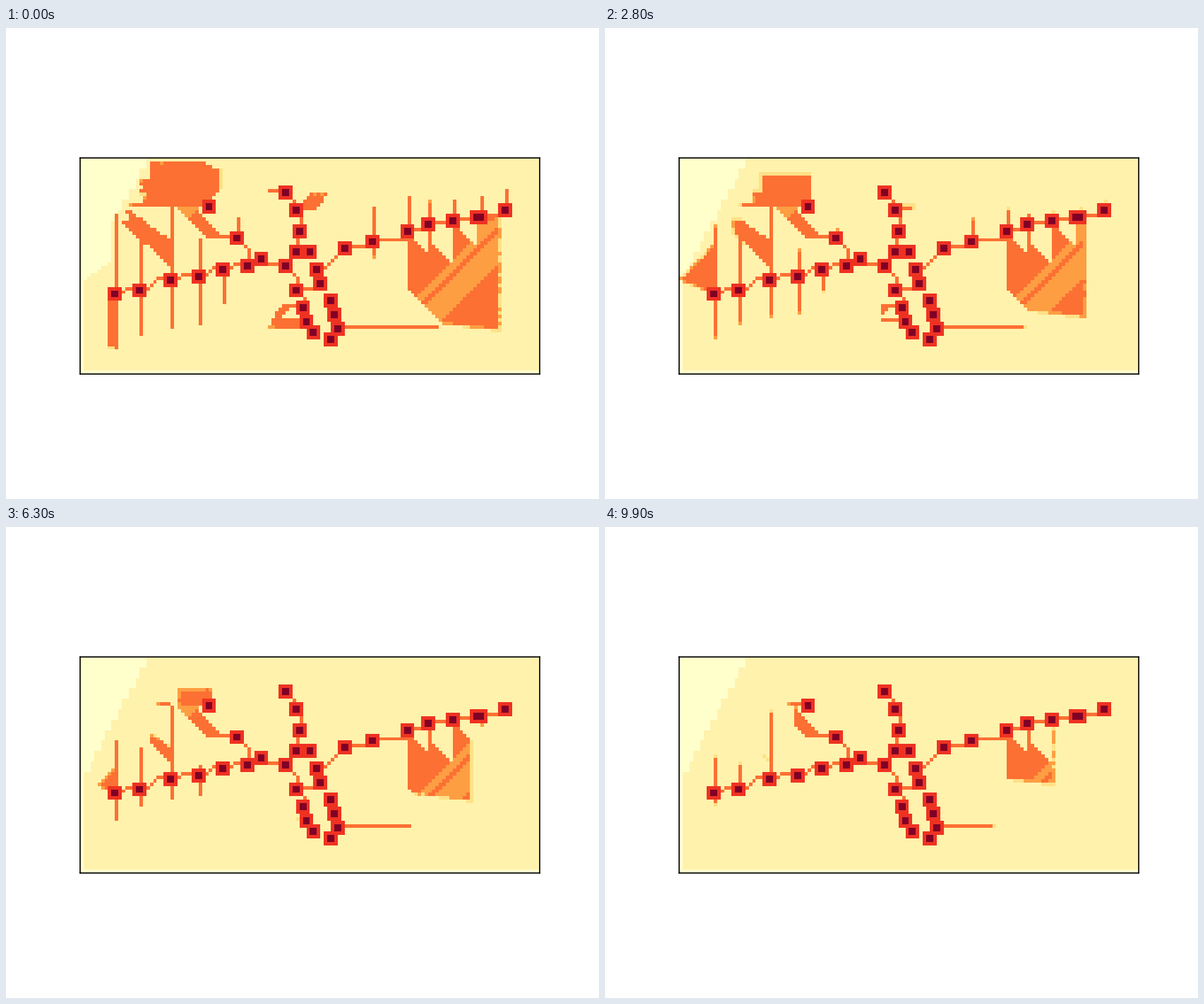
A matplotlib script that plays this animation: 840x667 px, repeating every 10000 ms.

```python
import numpy as np
import matplotlib.pyplot as plt
from matplotlib.animation import FuncAnimation
from matplotlib.path import Path

ROWS, COLS, FRAMES = 62, 132, 100
SPEED = 0.13  # cells worn away per frame
BASE, TIP, LIGHT, TRAIL, RED, CORE = 0.088, 0.2, 0.44, 0.556, 0.69, 1.0

R, C = np.mgrid[:ROWS, :COLS]
DIAG, SLANT = R + C, R - C
NOISE = np.random.default_rng(4).uniform(-0.13, 0.13, (ROWS, COLS))

# chains of linked nodes, as (col, row)
ROUTES = [
    [(10, 39), (17, 38), (26, 35), (34, 34), (41, 32), (48, 31), (52, 29), (59, 31)],
    [(45, 23), (48, 31)],
    [(59, 10), (62, 15), (63, 21), (62, 27), (59, 31), (62, 38)],
    [(122, 15), (115, 17), (114, 17), (107, 18), (100, 19), (94, 21), (84, 24),
     (76, 26)],
    [(68, 32), (76, 26)],
    [(69, 36), (62, 38), (64, 43), (65, 47), (67, 50)],
    [(72, 41), (73, 45), (74, 49), (72, 52)],
    [(37, 14)], [(66, 27)],
]

# node -> reach of its thread upwards and downwards
SPURS = {(10, 39): (23, 16), (17, 38): (20, 13), (26, 35): (21, 14),
         (34, 34): (11, 14), (41, 32): (0, 10), (45, 23): (6, 0),
         (84, 24): (10, 4.6), (94, 21): (9.8, 0), (100, 19): (6.5, 0),
         (107, 18): (5.8, 0), (115, 17): (5.8, 11), (122, 15): (6, 0)}


def inside(points):
    centers = np.column_stack([C.ravel() + 0.5, R.ravel() + 0.5])
    return Path(points).contains_points(centers).reshape(ROWS, COLS)


CLOUD = inside([(16, 0.5), (35, 1), (40.5, 3.5), (40.5, 9), (35.5, 14), (16, 14)])
BAND = inside([(28, 14), (34, 14), (34.5, 16), (40.5, 22), (40.5, 23), (36.5, 23)])
WING = inside([(12.8, 14), (19.3, 18.8), (27, 24.2), (27, 32.2), (20, 25.2),
               (17, 24), (11.8, 18), (14.8, 18.5)])
LEAF = inside([(63.5, 13), (67, 10), (71, 10), (70, 12.5), (67, 15), (63.5, 15)])
LOOP = (inside([(54, 48.5), (58, 42), (63, 42), (63, 49), (54, 49)])
        & ~inside([(57.6, 46), (60, 43), (63, 43), (63, 46)]))

SAIL = (C >= 94) & (SLANT <= -57)
STRIPES = (DIAG >= 136) & (DIAG < 150) & (DIAG // 1 != 139) & (DIAG != 140)
PALE_BITS = SAIL & (STRIPES | ((C >= 113) & (DIAG < 139) & (R > 17)))
PALE_BITS |= BAND & (DIAG < 48)


def walk(a, b):
    """Cells from a to b: diagonal steps first, then straight."""
    (c, r), (c1, r1) = a, b
    if abs(c1 - c) >= abs(r1 - r):
        c, r1 = c + 1, r1 - 1
    yield c, r
    while (c, r) != (c1, r1):
        c += np.sign(c1 - c)
        r += np.sign(r1 - r)
        yield c, r


def draw_network():
    net = np.zeros((ROWS, COLS))
    net[22, 36:44] = TRAIL
    for route in ROUTES:
        for a, b in zip(route, route[1:]):
            for c, r in walk(a, b):
                net[r, c] = TRAIL
    for half, value in ((2, RED), (1, CORE)):
        for c, r in sum(ROUTES, []):
            net[r - half:r + half, c - half:c + half] = value
    return net


NETWORK = draw_network()


def wear(frame):
    """Remaining life of each trail cell; zero or less is gone."""
    s = SPEED * frame
    life = np.full((ROWS, COLS), -1.0)

    def put(mask, *limits):
        value = np.minimum.reduce([limit + 0.0 * C for limit in limits])
        np.maximum(life, np.where(mask, value, -1), out=life)

    def low(i, start):
        return i + 1 - start - s

    def high(i, start):
        return start - s - i

    # threads
    for (c, r), (up, down) in SPURS.items():
        put((C == c) & (R < r), low(R, r - up))
        put((C == c) & (R >= r), high(R, r + down))
    put((C == 26) & (R >= 14) & (R < 35), low(R, 3))
    put((R == 48) & (C >= 75), high(C, 103))
    put((R == 9) & (C < 59) & (C > 50), low(C, 54.2))
    put((R == 13) & (C < 26), low(C, 14.3))
    put((R == 13) & (C >= 30) & (C < 36), low(C, 18.6))

    # top left patches
    shoulder = np.minimum(low(C, 18) + 6 * NOISE, low(R, 6.2))
    side = np.where(C < 38, 9, high(C, 40.2))
    put(CLOUD, low(R, 1.2), np.maximum(low(C, 20.2), shoulder), side)
    put(BAND, low(C, 20.2))
    put(WING, low(C, 12), low(R, 14.1), low(R - 0.8 * C, -0.7) + 0.025 * frame,
        np.where(SLANT < 5, 9, high(SLANT, 9.7)))

    # small patches
    put((C >= 8) & (C <= 10) & (R >= 41), low(C, 8.1), high(R, 54.3))
    put(LEAF, high(C, 71), low(R, 10.3))
    put(LOOP, low(C, 54.6), np.where(R < 47, 9, high(R, 48.8)))

    # fan that sweeps down the left edge and closes again
    gap = 10 - C
    top = 21 + 0.2 * (frame - 10) + gap
    bottom = min(39, 28 + 0.8 * (frame - 11)) - 0.4 * gap
    put(C <= 10, R + 1 - top, bottom - R)

    # sail on the right, hung from three teeth
    edge = np.select([C < 100, C == 100, C < 107, C <= 108, C < 114],
                     [C - 72, 20, C - 76, 20, 20 + (C - 108) * 0.9],
                     17 + min(s, 2))
    put(SAIL & (R >= edge), high(C, 120.3),
        high(R, 49.3) - 0.12 * high(C, 120))
    return life


def background(frame):
    """Pale corner with a stepped rim that the fan eats into."""
    rows = np.arange(ROWS)
    late = np.maximum(1, np.round(18.8 - 0.54 * (rows // 3 * 3)))
    early = np.maximum(late, np.clip(9 - 1.5 * (rows - 29), 1, 9))
    rim = np.where(frame > (rows - 17) * 1.3, late, early)
    grid = np.where(C < rim[:, None], 0, BASE)
    grid[-1] = 0
    return grid


def render(frame):
    life = wear(frame)
    aged = life + NOISE
    fresh = np.where(PALE_BITS, LIGHT, TRAIL)
    tone = np.select([aged < 0.35, aged < 0.7], [TIP, LIGHT], fresh)
    grid = np.where(life > 0, tone, background(frame))
    return np.where(NETWORK > 0, NETWORK, grid)


fig, ax = plt.subplots(figsize=(8.4, 6.67), dpi=100)
ax.set_xticks([])
ax.set_yticks([])
for spine in ax.spines.values():
    spine.set_linewidth(1.2)
image = ax.imshow(render(0), cmap="YlOrRd", vmin=0, vmax=1,
                  interpolation="nearest")


def update(frame):
    image.set_data(render(frame))
    return [image]


anim = FuncAnimation(fig, update, frames=FRAMES, interval=100, repeat=True,
                     repeat_delay=0)
plt.show()
```
